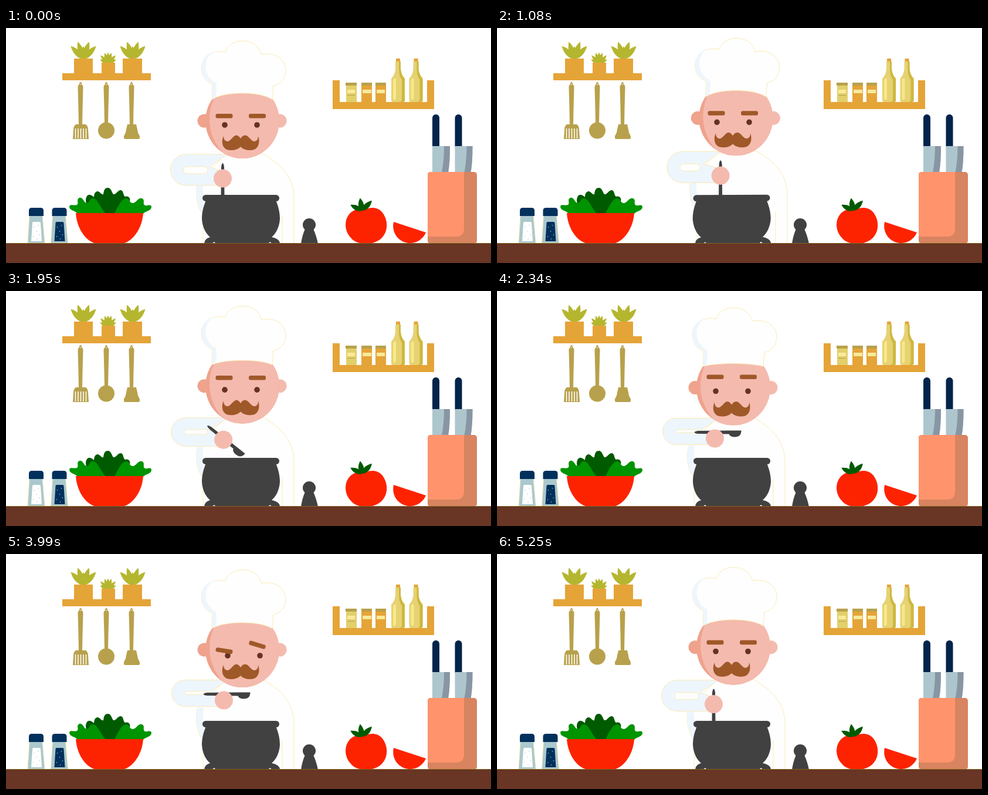
Write an HTML page that moves like this. It is 827x400 px and loops after 5.28 s.

```html
<!DOCTYPE html>
<html lang="en">
<head>
<meta charset="utf-8">
<title>Chef at the pot</title>
<style>
html, body { margin: 0; width: 100%; height: 100%; overflow: hidden; background: #fff }
svg { display: block }
.wood { fill: #e5a437 }
.brass { fill: #b8a14c }
.plant { fill: #b5b62f }
.iron { fill: #414141 }
.red { fill: #fd2300 }
.dark { fill: #005a00 }
.green { fill: #009400 }
.navy { fill: #02305c }
.skin { fill: #f4baae }
.flush { fill: #efa28c }
.hair { fill: #9f5828 }
.eye { fill: #643126 }
.shade { fill: #eef6fd }
.white { fill: #fefefe }
.line { stroke: #fae5a0; stroke-width: .8 }
</style>
</head>
<body>
<svg width="827" height="400" viewBox="0 0 827 400">
  <defs>
    <path id="leaf" d="M0 0C-7 -8 -6 -20 0 -31C6 -20 7 -8 0 0"/>
    <g id="bush" class="plant">
      <use href="#leaf" transform="rotate(-44)"/><use href="#leaf" transform="rotate(-18)"/>
      <use href="#leaf" transform="scale(1 .7)"/>
      <use href="#leaf" transform="rotate(18)"/><use href="#leaf" transform="rotate(44)"/>
    </g>
    <path id="handle" class="brass" d="M-2 97V94Q0 90 2 94V96Q4.500 97 4.500 101L3.500 138L3 166H-3L-3.500 138L-4.500 101Q-4.500 97 -2 96Z"/>
    <g id="bottle">
      <path fill="#e6d273" d="M7 57H16V70Q17 80 23 86V123Q23 126 20 126H3Q0 126 0 123V86Q6 80 7 70Z"/>
      <path fill="#cdb83f" d="M13 57H16V70Q17 80 23 86V123Q23 126 20 126H14Q18 126 18 121V88Q13 82 13 70Z"/>
      <path fill="#f7e888" d="M3 88Q8 82 8 88V120Q5 125 3 120Z"/>
      <rect class="wood" x="8" y="52" width="7" height="5"/>
    </g>
    <g id="knife">
      <rect x="0" y="147" width="12" height="60" rx="6" fill="#02244a"/>
      <path fill="#adc6cd" d="M0 201H30Q30 230 27 246H0Z"/>
      <path fill="#8896a4" d="M20 201H30Q30 230 27 246H16Q20 225 20 201Z"/>
    </g>
    <g id="shaker">
      <path class="line" fill="#aac8ce" d="M-11 319H11L15 366H-14Z"/>
      <path class="navy" d="M-12 320V311Q-12 306 -7 306H8Q13 306 13 311V320Z"/>
    </g>
    <path id="panel" d="M-4 330H6Q8 330 8 332L10 363H-8L-6 332Q-6 330 -4 330Z"/>
    <g id="grains"><circle cx="-3" cy="339" r=".8"/><circle cx="4" cy="336" r=".8"/><circle cx="1" cy="346" r=".8"/><circle cx="6" cy="352" r=".8"/><circle cx="-4" cy="355" r=".8"/><circle cx="2" cy="359" r=".8"/></g>
    <clipPath id="top"><rect y="4" width="827" height="396"/></clipPath>
    <clipPath id="face-clip"><ellipse cx="403" cy="158" rx="63" ry="64"/></clipPath>
  </defs>

  <!-- left shelf -->
  <use href="#bush" x="132" y="53"/>
  <use href="#bush" x="216" y="53"/>
  <g class="plant" transform="translate(174 60) scale(.6)">
    <use href="#bush"/><use href="#leaf" transform="rotate(-65) scale(1 .8)"/><use href="#leaf" transform="rotate(65) scale(1 .8)"/>
    <use href="#leaf"/>
  </g>
  <path class="wood" d="M96 77H116V52H148V77H163V59H186V77H199V52H232V77H247V89H96Z"/>
  <use href="#handle" x="127"/><use href="#handle" x="171"/><use href="#handle" x="214"/>
  <path class="brass" d="M119 164H136Q140 167 140 173L141 189H114L115 173Q115 167 119 164Z"/>
  <path stroke="#fff" stroke-width="1.6" d="M118.500 171V188M123 171V188M127.500 171V188M132 171V188M136.500 171V188"/>
  <circle class="brass" cx="171" cy="174.500" r="14"/>
  <path class="brass" d="M207 164H222Q224 172 225 178L228 184V187Q228 189 226 189H203Q201 189 201 187V184L204 178Q205 172 207 164Z"/>
  <path fill="none" stroke="#fff" d="M127 95V97M171 95V97M214 95V97"/>

  <!-- right shelf -->
  <path class="wood" d="M557 89H569V126H718V89H730V138H557Z"/>
  <path fill="#e2d06b" d="M580 97H598V126H580Z"/>
  <path class="wood" d="M606 97H624V126H606ZM630 97H648V126H630Z"/>
  <path class="brass" d="M579 93H598V98H579ZM606 93H624V98H606ZM630 93H648V98H630ZM582 114H595V115H582Z"/>
  <path fill="#f9ea9c" d="M582 105H595V111H582ZM608 105H623V111H608ZM632 105H646V111H632Z"/>
  <use href="#bottle" x="657"/><use href="#bottle" x="687.500"/>

  <!-- knives -->
  <use href="#knife" x="727"/><use href="#knife" x="765.500"/>
  <rect x="719" y="245" width="84" height="122" rx="5" fill="#d88460"/>
  <path fill="#ff946c" d="M724 245H781V341Q781 355 767 355H719V250Q719 245 724 245Z"/>

  <!-- left of the pot -->
  <use href="#shaker" x="51"/><use href="#shaker" x="90.500"/>
  <use href="#panel" x="51" fill="#fff"/><use href="#panel" x="90.500" class="navy"/>
  <use href="#grains" x="51" fill="#aac8ce"/><use href="#grains" x="90.500" fill="#aac8ce"/>
  <path class="dark" d="M146 316C136 302 134 292 138 286C142 281 147 285 150 288C150 281 154 276 159 279C162 281 163 284 166 283C167 275 169 272 174 272C179 272 180 279 183 283C188 284 190 276 196 276C201 277 199 284 203 287C208 285 213 289 211 295C208 302 204 306 207 316Z"/>
  <path class="green" d="M122 316C119 311 108 311 108 304C109 299 116 303 121 301C125 298 119 292 125 289C132 287 132 298 138 298C143 297 142 290 148 290C156 290 160 304 170 316ZM185 316C190 305 196 292 204 290C211 289 210 298 216 298C222 298 225 288 232 290C238 293 232 299 237 302C242 303 248 299 248 305C247 312 238 311 234 316Z"/>
  <path class="red" d="M119 315H234C232 345 212 367 196 367H157C140 367 121 345 119 315Z"/>

  <!-- right of the pot -->
  <path class="iron" d="M510 342H524Q529 353 532 367H503Q505 353 510 342Z"/>
  <circle class="iron" cx="517" cy="335" r="11"/>
  <path class="red" d="M612 309C622 304 634 305 641 313C653 328 651 347 641 357C630 370 598 371 588 357C577 346 576 327 586 316C593 309 603 306 612 309ZM661 330L716 348A29 29 0 0 1 661 330Z"/>
  <g class="dark" transform="translate(607 311) scale(1 .95)">
    <use href="#leaf" transform="rotate(-62) scale(.9 .72)"/><use href="#leaf" transform="rotate(-8) scale(.95 .74)"/>
    <use href="#leaf" transform="rotate(43) scale(.95 .8)"/>
  </g>

  <!-- chef -->
  <g id="body">
    <path class="white line" d="M375 214H438C465 230 491 250 491 290V390H336V318C326 305 322 285 326 264Z"/>
    <path class="shade" d="M326 262H338Q334 270 337 285V318C326 305 322 285 326 262Z"/>
    <path class="line" d="M471 390V318"/>
  </g>
  <path id="arm" class="shade line"/>
  <rect id="slot" class="white line"/>
  <g id="head">
    <circle class="flush" cx="338" cy="158" r="11.500"/>
    <circle class="skin" cx="467" cy="158" r="11.500"/>
    <ellipse class="flush" cx="403" cy="158" rx="63" ry="64"/>
    <ellipse class="skin" cx="418" cy="155" rx="71" ry="78" clip-path="url(#face-clip)"/>
    <g id="face">
      <g id="eyes" class="eye"><circle cx="373" cy="165" r="4.800"/><circle cx="428" cy="165" r="4.800"/></g>
      <rect id="browL" class="hair" x="-14.500" y="-3.700" width="29" height="7.400" rx="3"/>
      <rect id="browR" class="hair" x="-14.500" y="-3.700" width="29" height="7.400" rx="3"/>
      <path class="hair" d="M400 188C397 183 394 182 391 183C386 185 383 193 377 193C373 192 371 189 371 184C367 191 367 208 383 208C391 208 396 206 400 202C404 206 409 208 417 208C433 208 433 191 430 184C430 189 428 192 424 193C418 193 415 185 410 183C406 182 403 183 400 188Z"/>
    </g>
  </g>
  <g clip-path="url(#top)">
    <g id="hat">
      <path id="crown" class="white line"/>
      <path class="shade" d="M358 40C341 42 333 54 333 68C333 78 338 90 352 95L351.500 121.500L358 117.500Q360 100 358 93C346 88 337 72 342 56C345 47 350 42 358 40Z"/>
    </g>
  </g>
  <ellipse id="drop" rx="5" ry="2.500" fill="#f3d573"/>
  <path id="spoon" class="iron" d="M-35 0Q-34 -2 -28 -2.500L24 -3H45Q45 8 34 8Q26 8 24 3L-28 2.500Q-34 2 -35 0Z"/>
  <circle id="hand" class="skin" r="15.500"/>
  <g id="pot" class="iron">
    <rect x="335" y="284" width="131" height="11" rx="5.500"/>
    <path d="M341 293C336 305 334 315 334 325C335 340 341 350 348 356Q338 359 338 367H351L355 364L358 367H447L450 364L454 367H467Q467 359 453 356C460 350 466 340 467 325C467 315 465 305 460 293Z"/>
  </g>
  <rect y="367" width="827" height="33" fill="#693524"/>
  <path stroke="#80651f" d="M0 366.500H827"/>
</svg>
<script>
const LOOP = 5280, STIR_END = 1650, STIR = 330, ROCK = 550;

// time, head y, hat lift, brim bend, brow lift, sceptical look, hand y, spoon raised
const poses = [
  [0, 0, 0, 0, 0, 0, 256, 0],
  [STIR_END, 0, 0, 0, 0, 0, 256, 0],
  [2200, 6.5, 0, 8, -9, 0, 251, 1],
  [2500, 6.5, 0, 8, -9, 0, 251, 1],
  [2950, -1, -23, 8, -14, 0, 243, 1],
  [3130, -1, -23, 8, -14, 0, 243, 1],
  [3360, 0, 0, 0, 0, 0, 246, 1],
  [3540, 0, 0, 0, 0, 0, 246, 1],
  [3850, 5, 0, 1, 0, 1, 249, 1],
  [4020, 5, 0, 1, 0, 1, 249, 1],
  [4280, -9, 0, 0, -2, 0, 244, 1],
  [4560, 7.5, 0, 4, 0, 0, 250, 1],
  [4700, 7.5, 0, 4, 0, 0, 250, 1],
  [5130, 7.5, 0, 2, 0, 0, 252, 0],
  [LOOP, 0, 0, 0, 0, 0, 256, 0]
];

const el = id => document.getElementById(id);
const move = (id, x, y, turn = 0) =>
  el(id).setAttribute('transform', `translate(${x} ${y}) rotate(${turn})`);
const mix = (a, b, k) => a + (b - a) * k;

function poseAt(t) {
  const i = poses.findIndex(p => p[0] > t);
  const a = poses[i - 1], b = poses[i];
  const k = (t - a[0]) / (b[0] - a[0]), ease = k * k * (3 - 2 * k);
  return a.map((v, j) => mix(v, b[j], ease));
}

function draw(t) {
  const [, headY, hatLift, bend, browLift, look, handBase, raised] = poseAt(t);
  const stirring = t < STIR_END;
  const sway = stirring ? Math.sin(Math.PI * t / STIR) ** 2 : 0;
  const rock = stirring ? 1.6 * Math.sin(2 * Math.PI * t / ROCK) : 0;
  const handX = 369.5 + 2 * raised + 20 * sway, handY = handBase - 8 * sway;
  const headX = 7.5 * sway, y = headY - 8 * sway;

  move('head', headX, y);
  move('hat', headX + .5 * sway, y + hatLift);
  move('face', -4 * sway, browLift / 9);
  move('eyes', 5 * look, 3 * look);
  move('browL', 372, 149.7 + browLift + 10 * look, 9 * look);
  move('browR', 428.5, 149.7 + browLift, 17 * look);
  const brim = 107.5 + bend;
  el('crown').setAttribute('d', `M351 122L352 96C338 90 333 78 333 68C333 50 350 36 374 41
    C378 28 390 22 404 22C420 22 432 31 436 45C460 40 477 54 477 72C477 86 468 96 456 98
    L454 122C434 ${brim} 372 ${brim} 351 122Z`);

  const armY = handY - mix(41, 34.5, raised), armH = mix(53, 45, raised), r = armH / 2;
  const left = 280.5 + 2 * raised + 16 * sway, dx = 8 * sway;
  move('body', 7 * sway, armY - 215);
  el('arm').setAttribute('d', `M${378 + dx} ${armY}H${left + r}a${r} ${r} 0 0 0 0 ${armH}
    H${handX - 8}V${armY + 27}L${347 + dx} ${armY + 21}Z`);
  const slot = { x: left + 22, y: armY + mix(21, 19.5, raised), width: 344 + dx / 2 - left - 22,
    height: mix(12, 5, raised), rx: mix(6, 2.5, raised) };
  for (const key in slot) el('slot').setAttribute(key, slot[key]);

  move('spoon', handX, handY + mix(9, -10.5, raised), 90 * (1 - raised));
  move('hand', handX, handY);
  el('pot').setAttribute('transform', `rotate(${rock} 400 367)`);

  const fly = (t - 660) / 90;
  el('drop').style.display = Math.abs(fly) < 1 ? '' : 'none';
  move('drop', 456 + 18 * fly, 248 + 14 * fly * fly, -30 + 40 * fly);
}

function tick() {
  draw(performance.now() % LOOP);
  requestAnimationFrame(tick);
}
tick();
</script>
</body>
</html>
```
